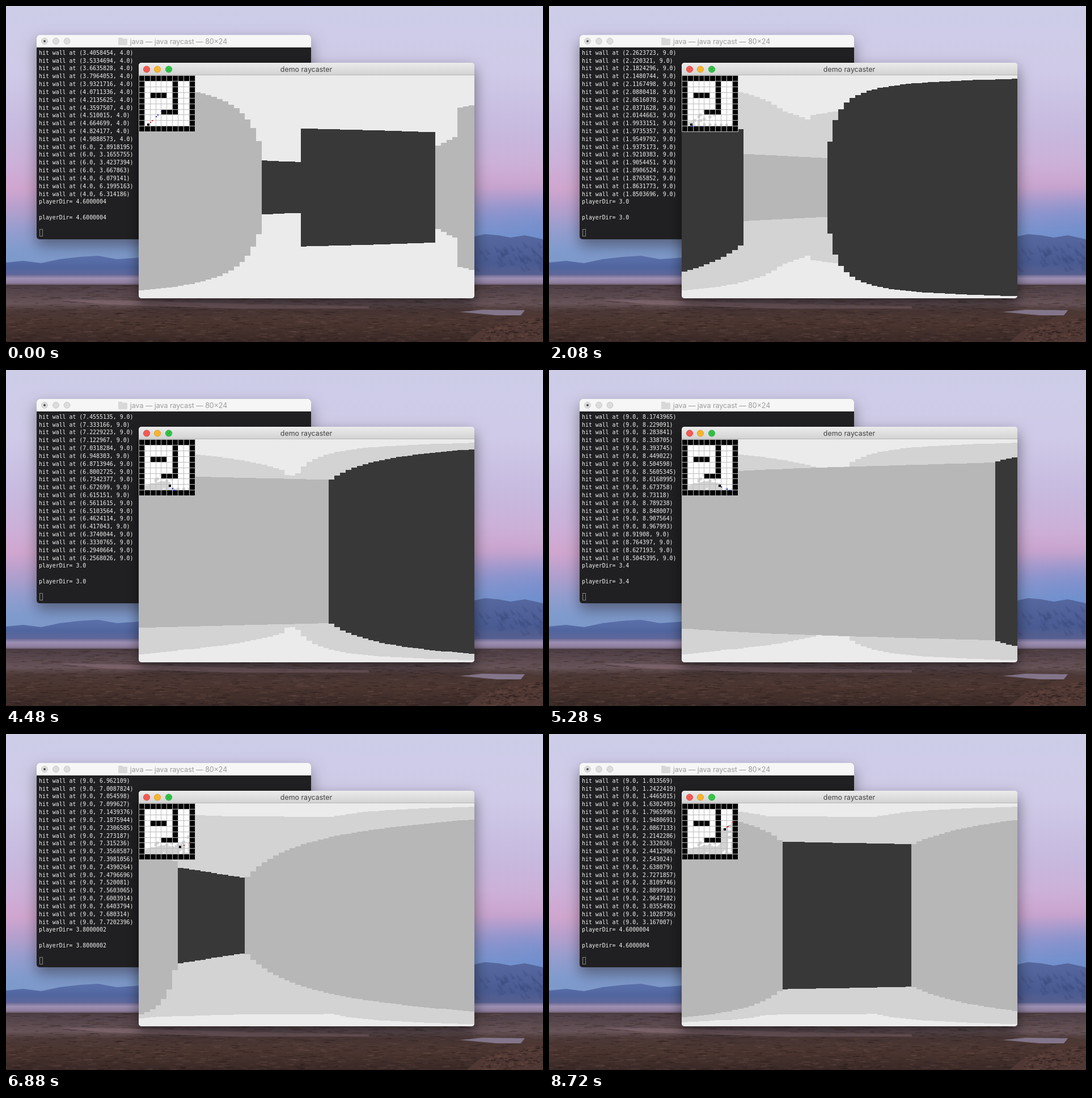
Animation, 947 px wide and 592 px high, one loop 8.8 s. Source, as an HTML page with a canvas:

```html
<!DOCTYPE html>
<html lang="en">
<head>
<meta charset="utf-8">
<title>demo raycaster</title>
<style>
html, body { margin: 0; width: 100%; height: 100%; overflow: hidden; }
canvas { display: block; }
</style>
</head>
<body>
<canvas id="stage" width="947" height="592"></canvas>
<script>
const W = 947, H = 592, LOOP = 8800, FRAME = 80;
const ctx = document.getElementById('stage').getContext('2d');

// ---------- world ----------
const MAP = [
  '##########',
  '#.....#..#',
  '#.....#..#',
  '#.###.#..#',
  '#.....#..#',
  '#.....#..#',
  '#...###..#',
  '#........#',
  '#........#',
  '##########'
];
const RAYS = 60, FOV = 1.4, STEP = 0.4;
const VIEW = { x: 234, y: 122.4, scale: 592 / 600 };
const CELL = 10 * VIEW.scale;
const f32 = Math.fround;
const isWall = (x, y) => MAP[y][x] === '#';

// first key time, end time, keys: + and - turn, f walks forward
const MOVES = [
  [240, 2080, '----'],
  [2200, 3600, '+ffffff'],
  [3700, 4480, 'f-fff'],
  [4580, 5920, 'ff+f+++'],
  [6040, 6880, '--ff'],
  [6880, 8720, '++ffffffff']
];

function cast(px, py, angle) {
  const dx = Math.cos(angle), dy = Math.sin(angle);
  const sx = Math.sign(dx), sy = Math.sign(dy);
  let cx = Math.floor(px), cy = Math.floor(py);
  let tx = (cx + (sx > 0) - px) / dx, ty = (cy + (sy > 0) - py) / dy;
  const crossings = [];
  for (;;) {
    const side = tx < ty, dist = side ? tx : ty;
    if (side) { cx += sx; tx += Math.abs(1 / dx); }
    else { cy += sy; ty += Math.abs(1 / dy); }
    const hit = {
      dist, side,
      x: side ? cx + (sx < 0) : px + dx * dist,
      y: side ? py + dy * dist : cy + (sy < 0)
    };
    crossings.push(hit);
    if (isWall(cx, cy)) return { ...hit, crossings };
  }
}

function look(time, x, y, dir) {
  const rays = [];
  // the bearing is accumulated in single precision
  let bearing = f32(dir + FOV / 2);
  for (let i = 0; i < RAYS; i++) {
    const ray = cast(x, y, Math.PI - bearing);
    ray.depth = ray.dist * Math.cos(bearing - dir);
    rays.push(ray);
    bearing = f32(bearing - f32(FOV / RAYS));
  }
  return { time, x, y, dir, rays, up: Math.sin(Math.PI - bearing) < 0 };
}

function buildStates() {
  let x = 1.5825434, y = 8.7139676, dir = f32(4.6000004);
  const turn = f32(STEP);
  const list = [look(0, x, y, dir)];
  for (const [from, to, keys] of MOVES) {
    [...keys].forEach((key, k) => {
      if (key === 'f') {
        x += STEP * Math.cos(Math.PI - dir);
        y += STEP * Math.sin(Math.PI - dir);
      } else {
        dir = f32(key === '+' ? dir + turn : dir - turn);
      }
      list.push(look(from + (to - from) * k / keys.length, x, y, dir));
    });
  }
  // nearest depth seen earlier in each column leaves a pale trace
  let trace = new Array(RAYS).fill(Infinity);
  for (const s of list) {
    s.trace = trace;
    trace = trace.map((d, i) => Math.min(d, s.rays[i].depth));
  }
  return list;
}
const states = buildStates();

function stateAt(time) {
  let index = 0;
  while (index + 1 < states.length && states[index + 1].time <= time) index++;
  return index;
}

function floatText(v) {
  v = f32(v);
  let p = 1;
  while (p < 9 && f32(+v.toPrecision(p)) !== v) p++;
  const s = String(+v.toPrecision(p));
  return s.includes('.') ? s : s + '.0';
}

// ---------- drawing helpers ----------
function rect(c, x, y, w, h, fill) {
  c.fillStyle = fill;
  c.fillRect(x, y, w, h);
}
function disc(c, x, y, r, fill, stroke) {
  c.beginPath();
  c.arc(x, y, r, 0, 7);
  c.fillStyle = fill;
  c.fill();
  if (stroke) { c.strokeStyle = stroke; c.lineWidth = 1; c.stroke(); }
}
function gradient(c, y0, y1, stops) {
  const g = c.createLinearGradient(0, y0, 0, y1);
  stops.forEach(([at, color]) => g.addColorStop(at, color));
  return g;
}
function polygon(c, points, fill) {
  c.beginPath();
  points.forEach(([x, y]) => c.lineTo(x, y));
  c.fillStyle = fill;
  c.fill();
}
function panel(c, x, y, w, h, radii, fill, shadow) {
  c.save();
  if (shadow) {
    c.shadowColor = `rgba(0,0,0,${shadow})`;
    c.shadowBlur = 26;
    c.shadowOffsetY = 11;
  }
  c.beginPath();
  c.roundRect(x, y, w, h, radii);
  c.fillStyle = fill;
  c.fill();
  c.restore();
}
function label(c, text, x, y, color) {
  c.font = '12.4px Inter, sans-serif';
  c.textAlign = 'center';
  c.textBaseline = 'alphabetic';
  c.fillStyle = color;
  c.fillText(text, x, y);
}

let seed = 7;
function rnd() {
  seed = (seed * 16807) % 2147483647;
  return seed / 2147483647;
}

// ---------- still parts ----------
function drawDesert(c) {
  rect(c, 0, 0, W, H, gradient(c, 0, 480, [
    [0, '#cdcde8'], [0.25, '#cfcae7'], [0.45, '#c7badf'], [0.58, '#ccb0d8'],
    [0.67, '#d0a6ce'], [0.75, '#b39fcd'], [0.83, '#929dce'], [0.9, '#7f9bcd'],
    [1, '#7a96c6']
  ]));
  const cool = c.createLinearGradient(500, 0, W, 0);
  cool.addColorStop(0, 'rgba(80,130,205,0)');
  cool.addColorStop(1, 'rgba(80,130,205,.5)');
  c.save();
  c.beginPath();
  c.rect(0, 280, W, 200);
  c.clip();
  c.filter = 'blur(25px)';
  rect(c, 0, 340, W + 60, 200, cool);
  c.restore();

  polygon(c, [[0, 452], [30, 449], [62, 453], [95, 446], [130, 442], [162, 440],
    [195, 446], [240, 443], [300, 455], [300, 480], [0, 480]],
    gradient(c, 440, 480, [[0, '#5d73ae'], [0.5, '#50659e'], [1, '#66689a']]));
  polygon(c, [[780, 430], [826, 406], [845, 402], [868, 404], [890, 408], [915, 404],
    [947, 411], [947, 486], [780, 486]],
    gradient(c, 402, 486, [[0, '#56689f'], [0.6, '#495b92'], [1, '#5f628f']]));
  for (let i = 0; i < 36; i++) {
    const x = 825 + rnd() * 122, y = 412 + rnd() * 48;
    polygon(c, [[x, y], [x + 12, y + 11], [x + 5, y + 13]], 'rgba(50,62,110,.2)');
  }

  rect(c, 0, 474, W, 20, gradient(c, 474, 494,
    [[0, '#6e6d98'], [0.3, '#9d8fb2'], [0.65, '#8f80a0'], [1, '#5f505d']]));
  rect(c, 0, 491, W, 101, gradient(c, 491, 592,
    [[0, '#4b3c43'], [0.2, '#5b4a50'], [0.33, '#67545a'], [0.45, '#4c3937'],
      [0.7, '#49342f'], [1, '#382826']]));
  for (let i = 0; i < 2600; i++) {
    const depth = rnd(), y = 493 + depth * 99, w = 5 + rnd() * (18 - depth * 8);
    const tones = ['30,20,22', '92,65,54', '66,45,41', '112,85,79'];
    rect(c, rnd() * W - 8, y, w, 1 + depth,
      `rgba(${tones[Math.floor(rnd() * 4)]},${0.1 + rnd() * 0.25})`);
  }
  polygon(c, [[90, 517], [220, 519], [420, 525], [640, 529], [640, 533], [400, 533],
    [180, 526]], 'rgba(140,113,120,.5)');
  polygon(c, [[800, 539], [840, 535], [915, 536], [908, 545], [865, 545]], '#83758a');
  polygon(c, [[812, 592], [832, 575], [850, 566], [872, 561], [888, 550], [915, 546],
    [947, 541], [947, 592]], '#4f3833');
  for (let i = 0; i < 220; i++) {
    const x = 835 + rnd() * 112, y = 566 + rnd() * 32 - (x - 835) * 0.17;
    rect(c, x, y, 3 + rnd() * 5, 2, rnd() < 0.5 ? 'rgba(38,25,25,.4)' : 'rgba(112,80,70,.3)');
  }
}

function drawWindows(c) {
  panel(c, 54, 51, 484, 360, 5, '#202022', 0.4);
  panel(c, 54, 51, 484, 22, [5, 5, 0, 0], '#f6f6f6');
  [68, 88, 107.5].forEach(x => disc(c, x, 62, 5.4, '#dcdcdc', '#c6c6c6'));
  disc(c, 68, 62, 2, '#505050');
  panel(c, 198, 56, 7, 4, 1, '#d2d2d2');
  panel(c, 198, 57.5, 16, 11.5, 1.5, '#d8d8d8');
  label(c, 'java — java raycast — 80×24', 304.5, 66.5, '#9b9b9b');

  panel(c, 234, 100, 592, 415, 5, '#ebebeb', 0.5);
  panel(c, 234, 100, 592, 22, [5, 5, 0, 0],
    gradient(c, 100, 122, [[0, '#ebebeb'], [1, '#d2d2d2']]));
  rect(c, 234, 121, 592, 1, '#b5b5b5');
  disc(c, 248, 111.5, 5.6, '#f25a52', '#da4a43');
  disc(c, 267, 111.5, 5.6, '#f6b52f', '#dc9f2a');
  disc(c, 287, 111.5, 5.6, '#33c748', '#29a83a');
  label(c, 'demo raycaster', 529.5, 116, '#404040');
}

const backdrop = document.createElement('canvas');
backdrop.width = W;
backdrop.height = H;
drawDesert(backdrop.getContext('2d'));
drawWindows(backdrop.getContext('2d'));

// ---------- moving parts ----------
function drawTerminal(state) {
  ctx.save();
  ctx.beginPath();
  ctx.rect(54, 73, 180, 338);
  ctx.clip();
  ctx.font = '9.9px "DejaVu Sans Mono", monospace';
  ctx.textAlign = 'left';
  ctx.textBaseline = 'alphabetic';
  ctx.fillStyle = '#f2f2f2';
  const dirLine = 'playerDir= ' + floatText(state.dir);
  const lines = state.rays.slice(-19)
    .map(r => `hit wall at (${floatText(r.x)}, ${floatText(r.y)})`)
    .concat(dirLine, '', dirLine);
  lines.forEach((line, i) => ctx.fillText(line, 58, 85.8 + i * 13.82));
  ctx.strokeStyle = '#858585';
  ctx.lineWidth = 1;
  ctx.strokeRect(59.5, 393.5, 5, 12);
  ctx.restore();
}

function drawSlice(i, depth, color) {
  const left = Math.round(VIEW.x + i * CELL), right = Math.round(VIEW.x + (i + 1) * CELL);
  const top = Math.round(VIEW.y + 20 * depth * VIEW.scale);
  const bottom = Math.round(VIEW.y + (400 - 20 * depth) * VIEW.scale);
  if (bottom > top) rect(ctx, left, top, right - left, bottom - top, color);
}

const mapX = x => VIEW.x + x * CELL, mapY = y => VIEW.y + y * CELL;

function drawMap(index) {
  const state = states[index];
  rect(ctx, VIEW.x, 122, 99, 99, '#fff');
  for (const past of states.slice(0, index)) {
    rect(ctx, mapX(past.x) - 5, mapY(past.y) - 5, 11, 11, '#d3d3d3');
    past.rays[RAYS - 1].crossings.forEach(p =>
      rect(ctx, mapX(p.x) - 2, mapY(p.y) - 2, 5, 5, '#d3d3d3'));
  }
  ctx.strokeStyle = '#bdbdbd';
  ctx.lineWidth = 1;
  MAP.forEach((row, y) => [...row].forEach((cell, x) => {
    const left = Math.round(mapX(x)), top = Math.round(mapY(y));
    const w = Math.round(mapX(x + 1)) - left, h = Math.round(mapY(y + 1)) - top;
    if (cell === '#') rect(ctx, left, top, w, h, '#000');
    ctx.strokeRect(left + 0.5, top + 0.5, w, h);
  }));
  for (const p of state.rays[RAYS - 1].crossings) {
    const color = state.up && p.dist < 1.95 ? '#e02020' : '#2030c8';
    rect(ctx, Math.round(mapX(p.x)), Math.round(mapY(p.y)), 2, 2, color);
  }
  rect(ctx, Math.round(mapX(state.x)) - 1, Math.round(mapY(state.y)) - 1, 4, 4, '#000');
}

function drawView(index) {
  const state = states[index];
  ctx.save();
  ctx.beginPath();
  ctx.roundRect(234, 122, 592, 393, [0, 0, 5, 5]);
  ctx.clip();
  rect(ctx, 234, 122, 592, 393, '#ebebeb');
  state.rays.forEach((ray, i) => {
    drawSlice(i, state.trace[i], '#d3d3d3');
    drawSlice(i, ray.depth, ray.side ? '#b7b7b7' : '#383838');
  });
  drawMap(index);
  ctx.restore();
}

function drawZoomDots() {
  for (const [dx, dy] of [[-2, -2], [2, -2], [0, 0], [-2, 2], [2, 2]])
    rect(ctx, 286.5 + dx, 111 + dy, 1, 1, '#126b20');
}

function draw(now) {
  const time = Math.floor((now % LOOP) / FRAME) * FRAME;
  ctx.drawImage(backdrop, 0, 0);
  // the terminal prints one frame behind the view
  drawTerminal(states[stateAt(time - FRAME)]);
  drawView(stateAt(time));
  if (time < LOOP - FRAME) drawZoomDots();
}

const start = performance.now();
function tick() {
  draw(performance.now() - start);
  requestAnimationFrame(tick);
}
tick();
</script>
</body>
</html>
```
